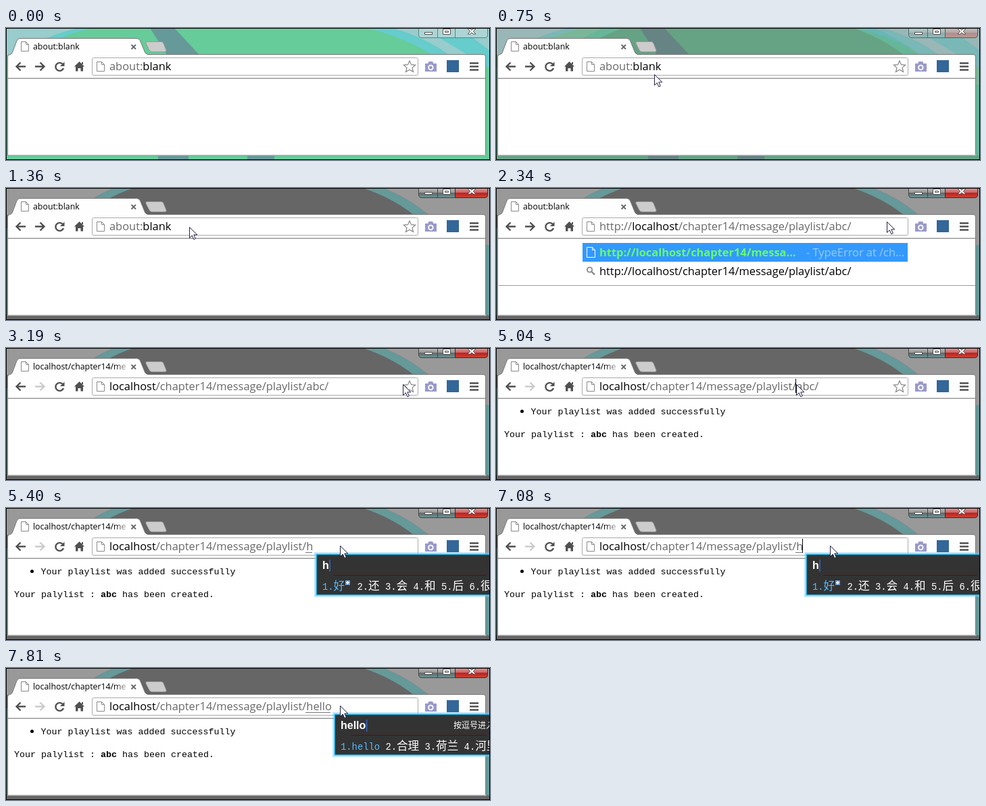
Recreate the animation shown at these times as an HTML page. Size 716x197 px, loop 8000 ms.

```html
<!DOCTYPE html>
<html lang="zh">
<head>
<meta charset="utf-8">
<title>Browser playlist demo</title>
<style>
html, body { margin: 0; width: 100%; height: 100%; overflow: hidden; background: #000; }
svg { display: block; width: 716px; height: 197px; }
text { white-space: pre; }
.ui { font: 16.42px "Open Sans", "Noto Sans", sans-serif; }
.strong { font-weight: bold; }
.tab { font: 12.35px "Open Sans", "Noto Sans", sans-serif; }
.page { font: 13.33px "Liberation Mono", monospace; fill: #000; }
.cjk { font-family: "Noto Sans CJK SC", "Noto Sans CJK", sans-serif; }
.key { font: bold 16px "Liberation Sans", Arial, sans-serif; fill: #fff; }
.cand { font: 13.83px "Liberation Mono", monospace; }
.cand .cjk { font-size: 16.6px; }
.dim { fill: #686868; }
.icon { fill: none; stroke: #505050; stroke-width: 2.4; }
</style>
</head>
<body>
<svg viewBox="0 0 716 197" xmlns="http://www.w3.org/2000/svg">
  <defs>
    <linearGradient id="fade" gradientUnits="userSpaceOnUse" x1="162" x2="183">
      <stop stop-color="#000"/><stop offset="1" stop-color="#000" stop-opacity="0"/>
    </linearGradient>
    <linearGradient id="red" x2="0" y2="1">
      <stop stop-color="#d99"/><stop offset=".45" stop-color="#c66"/><stop offset=".5" stop-color="#b22"/><stop offset="1" stop-color="#c43"/>
    </linearGradient>
    <linearGradient id="glass" x2="0" y2="1">
      <stop stop-color="#bbb"/><stop offset=".45" stop-color="#999"/><stop offset=".5" stop-color="#666"/><stop offset="1" stop-color="#699"/>
    </linearGradient>
    <clipPath id="selClip"><rect id="selClipBox" y="46" height="21"/></clipPath>
    <path id="doc" d="M.5 .5H7.5L11.5 4.5V14.5H.5ZM7.5 .5V4.5H11.5" fill="#fff" stroke="#888"/>
  </defs>

  <!-- glass frame, unfocused -->
  <g>
    <rect width="716" height="197" fill="#6c9"/>
    <path d="M0 0H108Q55 12 14 40H0Z" fill="#9cc"/>
    <path d="M108 0H128Q75 12 34 40H14Q55 12 108 0Z" fill="#6cc"/>
    <path d="M213 0H249L286 40H238Z" fill="#699"/>
    <path d="M533 0H572Q620 14 655 40H630Q590 14 533 0Z" fill="#6cc"/>
    <path d="M572 0H716V40H655Q620 14 572 0Z" fill="#9cc"/>
    <path d="M640 14H690L716 34V60Z" fill="#6cc"/>
    <path d="M225 191H270V197H225ZM357 191H397V197H357Z" fill="#699"/>
    <path d="M610.5 0V10Q610.5 14.5 615 14.5H708Q712.5 14.5 712.5 10V0M638.5 0V14M664.5 0V14" fill="#bdd" fill-opacity=".6" stroke="#588"/>
  </g>
  <!-- glass frame, focused -->
  <g id="focus">
    <rect width="716" height="197" fill="#666"/>
    <path d="M0 0H160Q125 14 96 40H0Z" fill="#999"/>
    <path d="M160 0H188Q146 15 114 40H96Q125 14 160 0Z" fill="#699"/>
    <path d="M528 0H558Q596 15 625 40H603Q572 15 528 0Z" fill="#699"/>
    <path d="M558 0H716V85H709V40H625Q596 15 558 0Z" fill="#999"/>
    <path d="M0 60H4V190H0ZM709 85H716V190H709Z" fill="#699"/>
    <path d="M610.5 0V10Q610.5 14.5 615 14.5H664.5V0ZM638.5 0V14" fill="url(#glass)" stroke="#444"/>
    <path d="M664.5 0H712.5V10Q712.5 14.5 708 14.5H664.5Z" fill="url(#red)" stroke="#522"/>
  </g>
  <g fill="#fff" stroke="#555">
    <rect x="619.5" y="6.5" width="11" height="3"/>
    <path d="M646.5 1.5H657.5V9.5H646.5ZM649.5 4.5H654.5V6.5H649.5Z"/>
    <path d="M683 1H687L689 3.3L691 1H695L691.3 5L695 9H691L689 6.7L687 9H683L686.7 5Z"/>
  </g>

  <!-- tab strip and toolbar -->
  <path d="M209 20.5H230Q232 20.500 233 23L237 33Q237.500 35.500 235 35.500H216Q213.500 35.500 212 33L207 23Q206 20.500 209 20.500Z" fill="#ccc" stroke="#999"/>
  <path d="M2.500 190.500V43Q2.500 39.500 6 39.500Q9 39 10 35L16 19Q17 15.500 21 15.500H193Q197 15.500 198.500 19L205 35Q206.500 39.500 211 39.500H706Q709.500 39.500 709.500 43V190.500Z" fill="#fefefe" stroke="#777"/>
  <path d="M3 74.500H709" stroke="#ccc"/>
  <path d="M3 75.500H709" stroke="#999"/>
  <rect x="4" y="76" width="705" height="113" fill="#fff"/>
  <path d="M3 189.500H710" stroke="#ccc"/>
  <path d="M2 190.500H711" stroke="#999"/>
  <use href="#doc" x="22" y="20"/>
  <text class="tab" id="title" x="40" y="32" fill="url(#fade)"></text>
  <path d="M185.500 25L192 31.500M192 25L185.500 31.500" stroke="#666" stroke-width="1.8"/>
  <g class="icon">
    <path d="M29 57.500H16M21.500 51.500L15.500 57.500L21.500 63.500"/>
    <path id="forward" d="M43 57.500H56M50.500 51.500L56.500 57.500L50.500 63.500"/>
    <path d="M84 54A6 6 0 1 0 85 60"/>
    <path d="M86.500 50.500V57H80Z" fill="#505050" stroke="none"/>
    <path d="M108.500 50L116 57.500H114V64.500H110.500V60H106.500V64.500H103V57.500H101ZM112 51H114V54H112Z" fill="#505050" stroke="none"/>
    <path d="M686 52.500H699M686 57.500H699M686 62.500H699"/>
  </g>
  <rect x="127.500" y="44.500" width="482" height="26" rx="2" fill="#fff" stroke="#aaa"/>
  <use href="#doc" x="134" y="50"/>
  <path id="star" d="M597 49L599.500 54.700L605.700 55.300L601 59.400L602.500 65.500L597 62.200L591.500 65.500L593 59.400L588.300 55.300L594.500 54.700Z" fill="#fff" stroke="#888" stroke-width="1.2"/>
  <path d="M620 53H624L625.500 50H631L632.500 53H637V65H620Z" fill="#99c"/>
  <circle cx="628.300" cy="59" r="3.300" fill="#99c" stroke="#fff" stroke-width="1.800"/>
  <rect x="652" y="48" width="18" height="18" fill="#369"/>

  <text class="ui" id="url" x="153" y="63"></text>
  <g id="sel">
    <rect id="selBox" y="46" height="21" fill="#39f"/>
    <text class="ui" id="selText" x="153" y="63" fill="#fff" clip-path="url(#selClip)"></text>
  </g>
  <path id="under" stroke="#777"/>
  <rect id="caret" y="46" width="1" height="21"/>

  <g id="page" class="page">
    <circle cx="38.500" cy="94.500" r="2.500"/>
    <text x="51.500" y="99">Your playlist was added successfully</text>
    <text x="12" y="133">Your palylist : <tspan font-weight="bold">abc</tspan> has been created.</text>
  </g>

  <g id="drop">
    <rect x="4" y="76" width="705" height="69" fill="#fff"/>
    <path d="M4 145.500H709" stroke="#999"/>
    <rect x="128" y="82" width="481" height="28" fill="#39f"/>
    <path d="M134.500 88.500H142.500L146.500 92.500V103.500H134.500ZM142.500 88.500V92.500H146.500" fill="none" stroke="#fff"/>
    <text class="ui strong" x="153" y="102" fill="#6f6">http://localhost/chapter14/messa...</text>
    <text class="ui" x="459" y="102" fill="#9cf">- TypeError at /ch...</text>
    <circle cx="138.500" cy="122" r="3.700" fill="none" stroke="#888" stroke-width="1.800"/>
    <path d="M141.500 125L146 129.500" stroke="#888" stroke-width="2.400"/>
    <text class="ui" x="153" y="130">http://localhost/chapter14/message/playlist/abc/</text>
  </g>

  <g id="tip">
    <rect x="580" y="77" width="140" height="20" fill="#000" opacity=".4"/>
    <rect x="577.500" y="74.500" width="150" height="20.500" fill="#fff" stroke="#666"/>
    <path d="M578 93.500H716" stroke="#ccf" stroke-width="2"/>
    <text class="cjk" x="583" y="89" font-size="12" fill="#444">点击生成二维码：<tspan font-family="Open Sans, sans-serif">http://localhost/</tspan></text>
  </g>

  <g id="ime">
    <rect x="0" y="68" width="300" height="63" fill="none" stroke="#6cf" stroke-width="4" opacity=".45"/>
    <rect x="1" y="69" width="300" height="61" fill="#333" stroke="#3cf" stroke-width="1.500"/>
    <text class="key" id="key" x="10" y="91"></text>
    <rect id="keyCaret" y="77" width="1.500" height="18" fill="#36c"/>
    <path id="rule" stroke="#700"/>
    <text class="cjk" id="hint" y="90" font-size="12" fill="#fff">按逗号进入英文</text>
    <g class="cand" id="cands"></g>
    <g id="badge"><rect x="44" y="108" width="7" height="7" fill="#69c"/><path d="M47.500 109V114M45 111.500H50" stroke="#fff" stroke-width="1.500"/></g>
  </g>

  <path id="mouse" d="M.5 .5V16.500L4.300 12.900L6.800 18.700L9.300 17.600L6.800 11.900H11.800Z" fill="#fff" stroke="#224"/>
  <rect x=".5" y=".5" width="715" height="196" fill="none" stroke="#000"/>
</svg>

<script>
const LOOP = 8000;
const $ = id => document.getElementById(id);
const show = (id, on) => $(id).setAttribute("display", on ? "inline" : "none");
const set = (id, attrs) => { for (const k in attrs) $(id).setAttribute(k, attrs[k]); };

// [first step, last step, number of steps, x, y]
const moves = [
  [100, 100, 1, 552, 149], [350, 510, 4, 228, 82], [650, 890, 5, 244, 50],
  [1060, 1160, 3, 279, 60], [1360, 1360, 1, 271, 58], [1440, 1610, 3, 36, 58],
  [1845, 2340, 10, 578, 50], [2395, 2510, 3, 587, 50], [2650, 2650, 1, 590, 50],
  [2890, 2990, 3, 587, 54], [3620, 3740, 3, 577, 54], [4250, 4250, 1, 566, 60],
  [4400, 5040, 12, 444, 54], [5240, 5400, 4, 494, 56]
];

// Share of the steps already taken at time t
function stepped(t, a, b, n) {
  if (t < a) return 0;
  if (t >= b) return 1;
  return (1 + Math.floor((t - a) / (b - a) * (n - 1) + 1e-6)) / n;
}

function mouseAt(t) {
  let x = 552, y = 149;
  for (const [a, b, n, tx, ty] of moves) {
    const k = stepped(t, a, b, n);
    x += (tx - x) * k;
    y += (ty - y) * k;
    if (k < 1) break;
  }
  return [Math.round(x), Math.round(y)];
}

// [start, typed letters, caret x, candidates]
const typing = [
  [5400, "h", 453, "好 还 会 和 后 很"],
  [7120, "he", 463, "和 喝 河 何 合 核"],
  [7180, "hell", 470, "hell 合 和 喝 河"],
  [7320, "hell", 470, "hell 合理 荷兰 河里"],
  [7520, "hello", 480, "hello 合 和 喝 河"],
  [7610, "hello", 480, "hello 合理 荷兰 河里"]
];

const span = (text, cls) => `<tspan class="${cls}">${text}</tspan>`;
const path = "/chapter14/message/playlist/";

function urlParts(t, letters) {
  if (t < 1790) return ["about:", "blank", ""];
  if (t < 3190) return ["http://", "localhost", path + "abc/"];
  return ["", "localhost", path + (t < 5400 ? "abc/" : letters)];
}

function drawIme(letters, left, words) {
  const size = 16.6, half = size / 2;
  let x = 10;
  const items = words.split(" ").map((word, i) => {
    const latin = /[a-z]/.test(word);
    const at = x;
    x += half * 3 + word.length * (latin ? half : size);
    if (!i && !latin) x += 10; // room for the badge
    return `<text x="${at}" y="122" fill="${i ? "#fff" : "#5bf"}">${i + 1}.${latin ? word : span(word, "cjk")}</text>`;
  });
  $("ime").setAttribute("transform", `translate(${left})`);
  $("key").textContent = letters;
  const end = 10 + $("key").getComputedTextLength();
  set("keyCaret", { x: end + .5 });
  set("rule", { d: `M26 100.5H${711 - left}` });
  set("hint", { x: 662 - left });
  show("hint", letters === "hello");
  $("cands").innerHTML = items.join("");
  show("badge", letters.length < 3);
}

function draw(t) {
  const [mx, my] = mouseAt(t);
  const typed = typing.filter(s => t >= s[0]).pop();
  const letters = typed ? typed[1] : "";
  const [pre, host, rest] = urlParts(t, letters);

  $("focus").setAttribute("opacity", stepped(t, 650, 890, 5));
  $("title").textContent = t < 3190 ? "about:blank" : "localhost/chapter14/me";
  $("url").innerHTML = span(pre, "dim") + span(host, "") + span(rest, "dim");
  $("selText").textContent = pre + host + rest;
  set("forward", { stroke: t < 3190 ? "#505050" : "#ccc" });

  // Dragged selection
  let from = 0, to = 0;
  if (t >= 1440 && t < 1790) [from, to] = [Math.max(153, mx), 244];
  if (t >= 5240 && t < 5400) [from, to] = [443, Math.min(477, mx)];
  const box = { x: from, width: to - from };
  set("selBox", box);
  set("selClipBox", box);
  show("sel", to > from);

  const caretX = typed ? typed[2] : t < 3190 ? 527 : 443;
  set("caret", { x: caretX });
  show("caret", (t >= 2890 && t < 2990) || (t >= 5040 && t < 5240) || (t >= 7080 && t < 7810));
  set("under", { d: `M443 66.5H${caretX}` });
  show("under", typed);

  show("star", t < 1790 || (t >= 3190 && t < 5400));
  show("drop", t >= 1790 && t < 3190);
  show("page", t >= 3620);
  show("tip", t >= 3740 && t < 4458);
  show("ime", typed);
  if (typed) drawIme(letters, caretX + 5, typed[3]);

  show("mouse", t >= 100);
  $("mouse").setAttribute("transform", `translate(${mx} ${my})`);
}

const start = performance.now();
function tick() {
  draw((performance.now() - start) % LOOP);
  requestAnimationFrame(tick);
}
tick();
</script>
</body>
</html>
```
